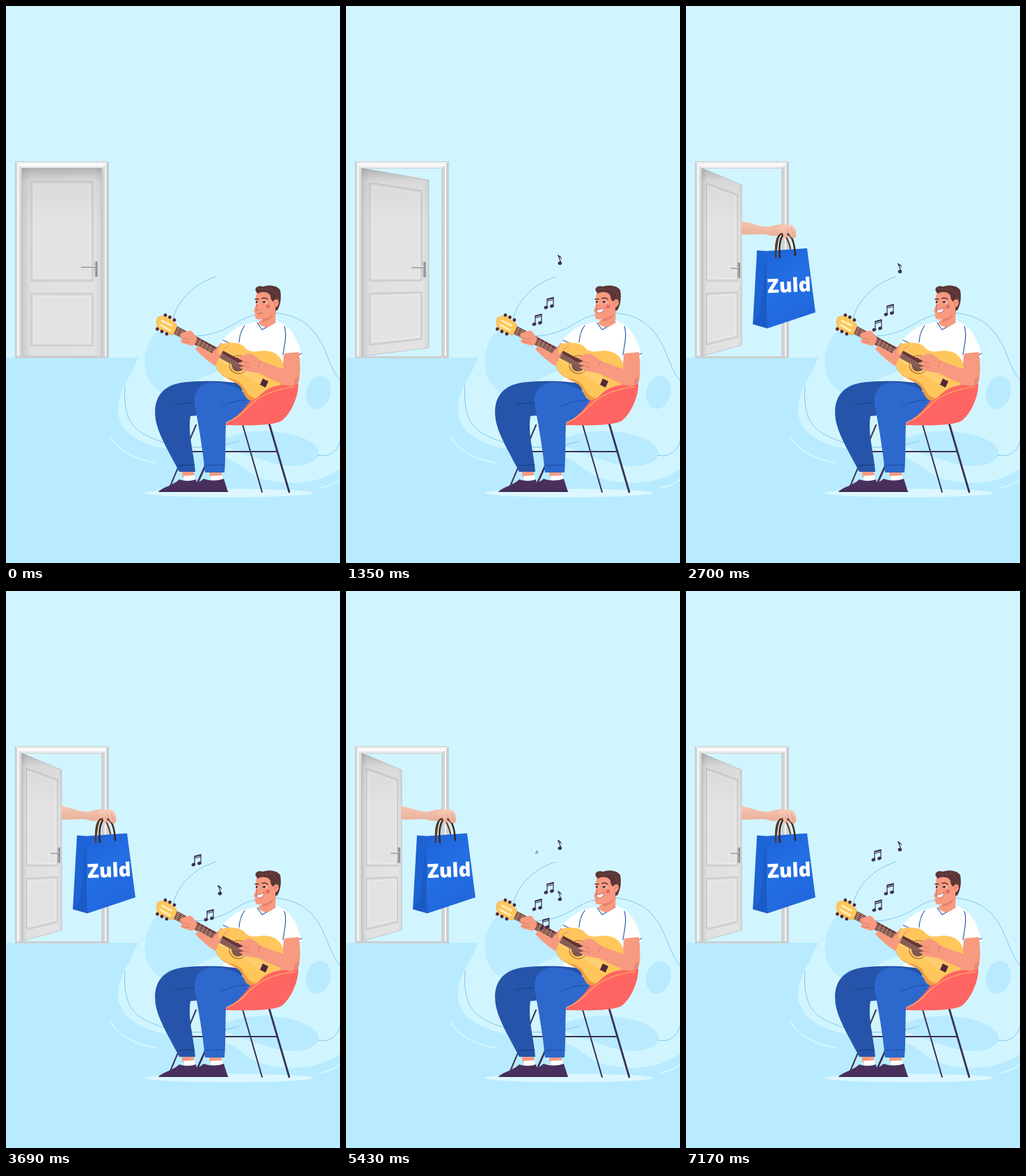
Animation, 480 px wide and 800 px high, one loop 7.2 s. Source, as an HTML page:

```html
<!DOCTYPE html>
<html lang="en">
<head>
<meta charset="utf-8">
<title>Guitar player and delivery</title>
<style>
html, body { margin: 0; width: 100%; height: 100%; overflow: hidden; background: #d1f5ff; }
svg { display: block; width: 100vw; height: 100vh; }
.line { fill: none; stroke-linecap: round; stroke-linejoin: round; }
.brand { font: 800 28px "Open Sans", "Noto Sans", sans-serif; fill: #fff; text-anchor: middle; }
</style>
</head>
<body>
<svg viewBox="0 0 480 800">
  <defs>
    <linearGradient id="leaf"><stop stop-color="#c9cacb"/><stop offset=".12" stop-color="#e0e0e1"/><stop offset=".9" stop-color="#e3e3e4"/><stop offset="1" stop-color="#d6d7d8"/></linearGradient>
    <linearGradient id="shade" x2="0" y2="1"><stop stop-color="#777" stop-opacity=".45"/><stop offset=".07" stop-color="#888" stop-opacity=".1"/><stop offset=".3" stop-color="#888" stop-opacity="0"/></linearGradient>
    <linearGradient id="post"><stop stop-color="#d4d6d8"/><stop offset=".3" stop-color="#f3f4f5"/><stop offset=".75" stop-color="#ebeced"/><stop offset="1" stop-color="#c9cccf"/></linearGradient>
    <linearGradient id="front" x2=".4" y2="1"><stop stop-color="#1c62d8"/><stop offset=".5" stop-color="#236fe4"/><stop offset="1" stop-color="#2167dc"/></linearGradient>
    <linearGradient id="skin" x2="0" y2="1"><stop stop-color="#f8cdb8"/><stop offset="1" stop-color="#e9ac95"/></linearGradient>
    <clipPath id="doorway"><rect x="79.5" y="200" width="300" height="330"/></clipPath>
    <g id="pair" fill="#3b3153">
      <path d="M-3 5.500V-6L6-8.500V3.500M-3-3L6-5.500" class="line" fill="none" stroke="#3b3153" stroke-width="1.200"/>
      <path d="M-3.500-6.500L6.500-9V-7L-3.500-4.500Z"/>
      <ellipse cx="-4.500" cy="6" rx="2.900" ry="2.300" transform="rotate(-18 -4.500 6)"/>
      <ellipse cx="4" cy="4" rx="2.900" ry="2.300" transform="rotate(-18 4 4)"/>
    </g>
    <g id="single" fill="#3b3153">
      <path d="M-2-7L2 4" class="line" stroke="#3b3153" stroke-width="1.200"/>
      <path d="M-3-7.500Q3-6 3-1Q1-4.500-2-5Z"/>
      <ellipse cx=".4" cy="4.500" rx="2.800" ry="2.400"/>
    </g>
  </defs>

  <!-- room -->
  <path fill="#d1f5ff" d="M0 0H480V800H0Z"/>
  <path fill="#b8ebff" d="M0 505H480V800H0Z"/>
  <path fill="#d1f5ff" d="M204 474C192 500 184 522 172 541C157 570 157 592 173 610C204 640 253 638 298 644C336 650 342 672 372 680C412 690 456 684 480 664V490H205Z"/>
  <path fill="#bcecff" d="M222 464C197 480 194 520 207 540C218 558 236 562 254 550C276 534 300 525 322 520L246 472Z"/>
  <ellipse cx="449" cy="555" rx="17.500" ry="24" fill="#b8ebff" transform="rotate(14 449 555)"/>
  <path fill="#b8ebff" d="M304 626C334 608 380 607 414 616C444 624 456 640 446 650C433 664 402 663 378 655C350 646 326 640 304 626Z"/>
  <g class="line" stroke="#7cc6f0" stroke-width="1">
    <path d="M301 389C270 399 247 422 240 449"/>
    <path d="M272 474C292 474 314 466 331 455C368 431 419 439 441 466C462 490 462 516 480 538"/>
    <path d="M171 545C168 590 180 607 206 619C245 637 294 638 335 625"/>
    <path d="M448 645C464 649 476 640 480 625"/>
  </g>
  <g class="line" stroke="#d9f7ff" stroke-width="1.800">
    <path d="M150 619C164 640 188 652 215 656M453 692Q469 689 480 680"/>
  </g>

  <!-- door -->
  <g>
    <path fill="url(#post)" d="M13 223H23.500V506H13ZM137.500 223H147.500V506H137.500Z"/>
    <path fill="#eff0f1" d="M13 223H147.500L138 233H23Z"/>
    <path class="line" stroke="#c6c9cc" stroke-width="1.200" d="M13.500 505V223.500H147V505M22.500 504V233H138V504"/>
    <path class="line" stroke="#fff" stroke-width="2" d="M17.500 505V228H143V505"/>
    <path fill="#cdcfd1" d="M13 503H148V506H13Z"/>
    <g id="leaves"></g>
  </g>

  <!-- delivery -->
  <g clip-path="url(#doorway)"><g id="delivery">
    <path fill="url(#skin)" d="M-60 302H60L81 309C96 312 107 318 119 317C130 313 143 312 151 316Q160 322 158 331Q154 337 147 332L135 329Q125 332 115 328C104 327 94 329 81 328H-60Z"/>
    <path class="line" stroke="#6e3b25" stroke-width="2.200" d="M129 363C130 344 132 328 137 328C144 328 151 342 151 360"/>
    <path fill="#1e63d4" d="M102 351L116 352L117 463L96 457Z"/>
    <path fill="#1957bf" d="M116 352L107 440L96 457L117 463Z" opacity=".6"/>
    <path fill="url(#front)" d="M115 352L174 348L186 440L117 463Z"/>
    <path class="line" stroke="#38271f" stroke-width="2.500" d="M135 361C133 342 136 327 144 327C152 328 156 341 157 358"/>
    <path class="line" stroke="#59351f" stroke-width="2.200" d="M129 361C128 341 131 328 138 327"/>
    <path fill="url(#skin)" d="M130 319Q143 311 153 315Q160 321 158 331Q155 337 150 331L146 325L144 333Q140 334 139 326Z"/>
    <path class="line" stroke="#d59a80" stroke-width=".8" d="M145 320L150 330M151 319L155 329"/>
    <text class="brand" transform="translate(148.500 411) rotate(-2.500)">Zuld</text>
  </g></g>

  <!-- chair, back legs -->
  <ellipse cx="320.500" cy="699.500" rx="121" ry="6" fill="#dcf7ff"/>
  <g class="line" stroke="#3b3158">
    <path stroke-width="2" d="M340 601L368 698M273 602L235 692M264 640H390"/>
    <path stroke-width="2.800" d="M378 599L407 698M300 630L273 690"/>
  </g>

  <!-- torso -->
  <path fill="#fff" d="M340 458L362 453Q372 464 387 451L401 458C416 470 421 489 426 503Q413 509 399 508L396 549L341 550L310 540L326 515L309 483C316 474 325 465 340 458Z"/>
  <g class="line" stroke="#2b5ea9" stroke-width="1.200">
    <path d="M361 455L368 465L387 454M343 459Q336 468 335 483M400 460C404 472 400 488 398 501M399 504Q413 505 425 499M312 480L325 486"/>
  </g>

  <!-- seat -->
  <path fill="#ff6562" d="M315 602L340 560L375 546L420 542C421 562 407 590 394 597C374 604 342 602 315 602Z"/>

  <!-- legs -->
  <path fill="#f79a7f" d="M252 666H270V677H254ZM291 666H310V676H293Z"/>
  <path fill="#fff" d="M255 675L271 674L272 683H256ZM294 675L311 674L312 682H295Z"/>
  <path fill="#49305c" d="M219 698C225 691 241 688 249 680Q261 684 273 680L277 698Z"/>
  <path fill="#2554aa" d="M348 545C322 537 275 538 252 541C222 546 211 566 215 594C219 617 237 645 249 669H272C270 642 261 615 265 589L300 586Z"/>
  <path class="line" stroke="#173d84" stroke-width="1" d="M246 660L271 659M243 573Q254 570 272 570"/>
  <path fill="#49305c" d="M249 698C258 690 274 688 284 679Q298 684 313 679L319 698Z"/>
  <path class="line" stroke="#322549" stroke-width="1" d="M220 697H319"/>
  <path fill="#2d68cc" d="M351 567C342 548 314 539 294 541C275 544 268 557 272 577C278 609 283 639 286 670H314C316 646 315 622 316 599C334 590 343 577 351 567Z"/>
  <path class="line" stroke="#1d4ba0" stroke-width="1" d="M285 660L314 659M310 575Q324 567 345 566"/>
  <path class="line" stroke="#ffb665" stroke-width="1.200" d="M317 598C337 591 346 577 357 568C374 555 395 549 416 547"/>

  <!-- neck and head -->
  <path fill="#f79a7f" d="M400 499L421 497C423 517 425 536 414 542Q407 547 390 543L396 529Z"/>
  <path fill="#f79a7f" d="M369 436H388L387 454Q374 468 362 455L368 449Z"/>
  <path fill="#e7806b" d="M369 449Q380 449 385 439L383 446Q378 452 369 453Z"/>
  <path fill="#f79a7f" d="M361 410C358 420 359 425 359 430L356 438L358 441C357 447 359 451 365 450C376 449 384 444 387 437Q394 434 392 425Q390 421 386 424V409Z"/>
  <path fill="#5b3637" d="M362 413Q357 409 359 405Q362 401 369 403C378 400 390 401 394 408C396 417 395 429 390 437L387 438Q388 430 385 425Q380 423 380 416Q377 411 371 411Q367 410 362 413Z"/>
  <path class="line" stroke="#754643" stroke-width="1" d="M363 406Q374 408 382 406Q390 411 391 421"/>
  <path fill="#f79a7f" d="M383 428Q385 419 391 422Q394 428 388 433Z"/>
  <path class="line" stroke="#ce6a60" stroke-width="1" d="M386 429Q386 425 390 425M361 429L359 436L363 437"/>
  <path class="line" stroke="#522f34" stroke-width="1.500" d="M358 421L363 421M368 420Q372 418 376 421"/>
  <path fill="#fff" d="M359 425H363V427H359ZM369 425H375L374 427H369Z"/>
  <path fill="#3d2937" d="M359 424H362V426.500H359ZM369 424H373V426.500H369Z"/>
  <circle cx="376.500" cy="431.500" r="2.800" fill="#e7686c"/>
  <path id="calm" class="line" stroke="#bd514f" stroke-width="1.200" d="M362 442Q365 441 368 441"/>
  <path id="smile" fill="#fff" stroke="#b34d4d" stroke-width=".8" d="M360 436Q366 437 371 433Q370 441 363 441Q360 440 360 436Z"/>

  <!-- guitar -->
  <path fill="#ffc75b" d="M309 488C318 482 336 482 343 490C350 499 359 496 370 495C388 495 399 505 399 523Q399 536 393 545C382 546 372 552 365 559Q359 566 351 566C343 563 342 555 338 548C334 541 326 540 315 533C301 526 296 502 309 488Z"/>
  <path fill="#ed9d45" d="M301 510C302 526 313 532 322 535C338 538 340 545 345 553Q350 562 359 563Q354 567 350 566C343 563 342 555 338 548C334 541 326 540 315 533C305 527 300 519 301 510Z"/>
  <circle cx="334" cy="515" r="13" fill="none" stroke="#a45d36" stroke-width="1.200"/>
  <circle cx="334" cy="515" r="10" fill="#562c31"/>
  <path fill="#ffc75b" stroke="#e7a243" stroke-width=".6" d="M218 447L229 444L245 457L246 465L239 473L219 464Q214 455 218 447Z"/>
  <path class="line" stroke="#fff0c1" stroke-width="2.600" d="M224 452L238 459M222 458L236 466"/>
  <g fill="#51293a">
    <circle cx="229" cy="444" r="2.400"/><circle cx="235.500" cy="447" r="2.400"/><circle cx="242" cy="451" r="2.400"/>
    <circle cx="217.500" cy="464" r="2.400"/><circle cx="224" cy="467.500" r="2.400"/><circle cx="231" cy="471" r="2.400"/>
  </g>
  <path fill="#64343a" d="M246 460L338 509L333 519L241 471Z"/>
  <g id="frets" class="line" stroke="#d99470" stroke-width=".8"></g>
  <g id="strings" class="line" stroke="#ffe4b0" stroke-width=".6"></g>
  <path fill="#51293a" d="M369 535L377 539L373 548L365 544Z"/>

  <!-- arms -->
  <path fill="#f79a7f" d="M309 484L322 488Q309 495 306 506L301 517Q290 511 272 493L276 488L296 499Z"/>
  <path fill="#f79a7f" d="M251 471Q259 465 267 467L274 476Q274 486 267 488L253 484Q249 480 254 477Q249 475 251 471Z"/>
  <path class="line" stroke="#d86e62" stroke-width=".8" d="M254 477L264 479M255 482L264 483"/>
  <path fill="#ffc75b" d="M309 486Q319 482 326 484L314 491L306 501Q304 493 309 486Z"/>
  <path fill="#f79a7f" d="M333 506L344 500C354 497 357 503 367 510L400 522L403 508L421 506Q423 520 422 532Q421 545 408 546C392 541 378 535 363 527Q351 526 345 524L335 519L342 517L333 513L341 510Z"/>
  <path class="line" stroke="#d86e62" stroke-width=".8" d="M339 509L350 514M341 517L350 519M367 510Q363 513 363 518"/>
  <path fill="#ef8672" d="M414 541Q413 534 421 533Q422 541 416 545Z"/>

  <g id="notes"></g>
</svg>

<script>
const $ = id => document.getElementById(id);
const LOOP = 7200;
const SMILE_AT = 1000, OPEN_AT = 1480, ARM_FROM = 1530, ARM_TO = 2130;

// A door leaf hinged at the left; its free edge is at x, from top to bottom.
function leaf(x, top, bottom) {
  const at = (u, y) => {
    const v = (y - 233) / 270;
    const right = top + v * (bottom - top);
    return (23 + u * (x - 23)).toFixed(1) + ' ' + (y + u * (right - y)).toFixed(1);
  };
  const quad = (u1, y1, u2, y2) =>
    `M${at(u1, y1)}L${at(u2, y1)}L${at(u2, y2)}L${at(u1, y2)}Z`;
  const panel = (y1, y2) =>
    `<path d="${quad(.115, y1, .895, y2)}" fill="#d9d9da" stroke="#bebfc1"/>` +
    `<path d="${quad(.15, y1 + 4, .86, y2 - 4)}" fill="#e3e3e4" stroke="#f1f1f2"/>`;
  const k = (x - 23) / 114, hx = x - 7 * k - 1, hy = 378 + (1 - k) * 3;
  const lever = 20 * k, outline = quad(0, 233, 1, 503);
  return `<g><path d="${outline}" fill="url(#leaf)" stroke="#bbbdbf" stroke-width=".8"/>` +
    panel(252, 395) + panel(413, 488) +
    `<path d="${outline}" fill="url(#shade)"/>` +
    `<path d="M${hx - 1.5} ${hy - 11}h4v22h-4Z" fill="#a5a7aa"/>` +
    `<path d="M${hx + 1.5} ${hy - 11}v22" stroke="#797c80"/>` +
    `<path d="M${hx} ${hy - 3}h${-lever}" class="line" stroke="#97999c" stroke-width="2.2"/>` +
    `<path d="M${hx} ${hy - 4}h${-lever}" class="line" stroke="#e4e5e6"/></g>`;
}
$('leaves').innerHTML = leaf(137, 233, 503) + leaf(119, 250, 491) + leaf(80, 257, 487);
const leaves = [...$('leaves').children];

for (let i = 0; i < 13; i++) {
  const x = 249 + i * 5.2, y = 462 + i * 2.8;
  $('frets').innerHTML += `<path d="M${x} ${y}l-4.600 9.800"/>`;
}
for (let i = 0; i < 5; i++) {
  const dx = -i * .95, dy = i * 2;
  $('strings').innerHTML += `<path d="M${246 + dx} ${462 + dy}L${374 + dx} ${537 + dy}"/>`;
}

// Each note's path: [age, x, y]; it grows at the first point and shrinks at the last.
const starts = [0, 1470, 3000, 4080, 4830, 5840];
const kinds = [
  { shape: 'single', path: [[0, 340, 516], [270, 307, 469], [690, 307, 430], [1230, 307, 377], [1350, 307, 365], [1520, 307, 353]] },
  { shape: 'pair', path: [[330, 267, 516], [690, 292, 466], [1230, 292, 437], [1350, 292, 427], [1770, 292, 400], [2100, 293, 388]] },
  { shape: 'pair', path: [[780, 254, 516], [1230, 275, 459], [1350, 275, 451], [1770, 274, 420], [2010, 275, 400], [2220, 274, 387], [2340, 274, 380], [2460, 274, 374]] }
];
const clamp = v => Math.max(0, Math.min(1, v));
const notes = starts.flatMap(start => kinds.map(({ shape, path }) => {
  const el = document.createElementNS('http://www.w3.org/2000/svg', 'use');
  el.setAttribute('href', '#' + shape);
  $('notes').append(el);
  return { el, start, path };
}));

function placeNote({ el, start, path }, t) {
  const age = t - start, end = path[path.length - 1][0];
  const shown = age > path[0][0] && age < end;
  el.style.display = shown ? '' : 'none';
  if (!shown) return;
  const i = path.findIndex(p => p[0] >= age);
  const [t1, x1, y1] = path[i - 1], [t2, x2, y2] = path[i];
  const k = (age - t1) / (t2 - t1);
  const size = Math.min(clamp((age - path[0][0]) / 200), clamp((end - age) / 120));
  el.setAttribute('transform',
    `translate(${x1 + (x2 - x1) * k} ${y1 + (y2 - y1) * k}) scale(${size})`);
}

function draw(t) {
  const stage = t < SMILE_AT ? 0 : t < OPEN_AT ? 1 : 2;
  leaves.forEach((el, i) => { el.style.display = i === stage ? '' : 'none'; });
  $('calm').style.display = stage ? 'none' : '';
  $('smile').style.display = stage ? '' : 'none';
  const p = clamp((t - ARM_FROM) / (ARM_TO - ARM_FROM));
  $('delivery').style.display = t < ARM_FROM ? 'none' : '';
  $('delivery').setAttribute('transform', `translate(${-110 * (1 - p) ** 2} 0)`);
  notes.forEach(n => placeNote(n, t));
}

let origin;
function tick(now) {
  origin ??= now;
  draw((now - origin) % LOOP);
  requestAnimationFrame(tick);
}
draw(0);
requestAnimationFrame(tick);
</script>
</body>
</html>
```
